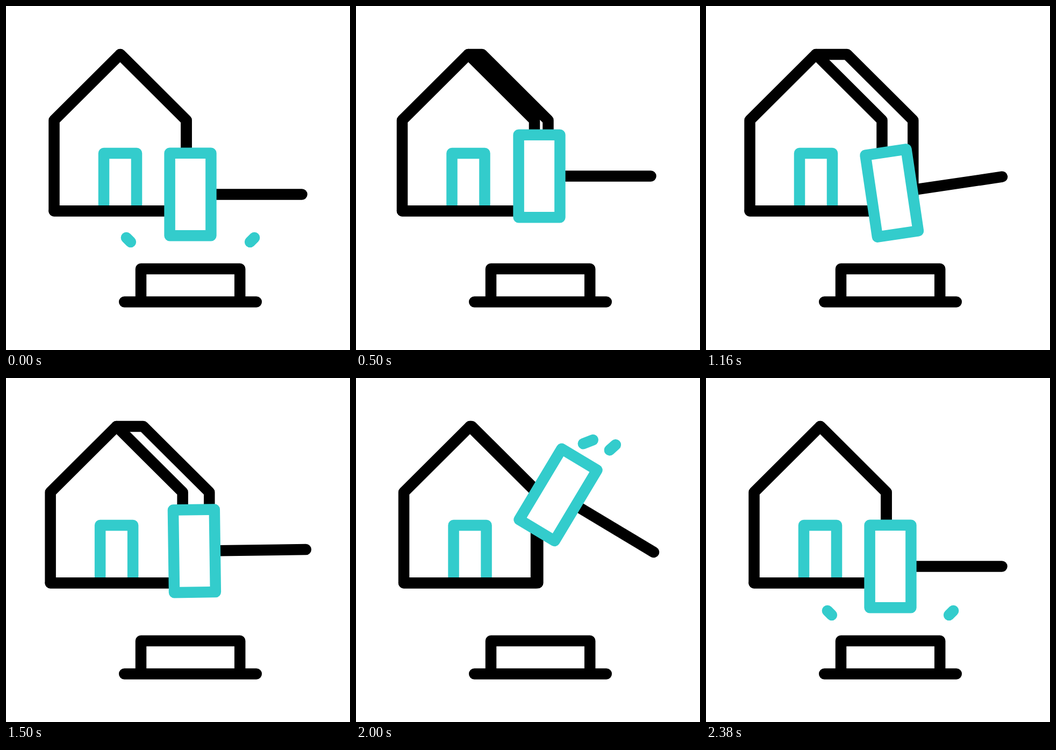
Animation, 640 px wide and 640 px high, one loop 2400 ms. Source, as an HTML page:

```html
<!DOCTYPE html>
<html lang="en">
<head>
<meta charset="utf-8">
<title>House auction</title>
<style>
  html, body { margin: 0; width: 100%; height: 100%; overflow: hidden; background: #fff; }
  svg { display: block; width: 100vw; height: 100vh; }
  path { fill: none; stroke: #000; stroke-width: 20.5; stroke-linecap: round; stroke-linejoin: round; }
  .teal { stroke: #33cccc; }
  .door { stroke-linecap: butt; }
  .head { fill: #fff; }
</style>
</head>
<body>
<svg viewBox="0 0 640 640">
  <path id="door" class="teal door" d="M182 381V274H243V381"/>
  <path id="back"/>
  <path id="front" d="M89.5 381.2V212.5L212.5 90L335.5 212.5V381.2Z"/>
  <path d="M251 550.4V489H435.2V550.4M220.2 550.4H465.8"/>
  <path id="sparkL" class="teal"/>
  <path id="sparkR" class="teal"/>
  <g id="hammer">
    <path d="M-180 0H0"/>
    <path class="teal head" d="M-245.9 -76.8h76.8v153.6h-76.8Z"/>
    <path id="trailA" class="teal"/>
    <path id="trailB" class="teal"/>
  </g>
</svg>
<script>
const LOOP = 2400;
const $ = id => document.getElementById(id);
const clamp = (v, a, b) => Math.min(b, Math.max(a, v));

// Eased step from 0 to 1 between two times.
function ease(t, from, to) {
  const u = clamp((t - from) / (to - from), 0, 1);
  return u * u * (3 - 2 * u);
}

function segment(id, x1, y1, x2, y2, shown) {
  $(id).setAttribute('d', shown ? `M${x1} ${y1}L${x2} ${y2}` : '');
}

function shift(id, dx) {
  $(id).setAttribute('transform', `translate(${dx} 0)`);
}

function house(t) {
  const depth = ease(t, 114, 954) - ease(t, 1310, 2118);
  const near = -8 * depth, far = 49.8 * depth;
  shift('front', near);
  shift('door', near);
  $('back').setAttribute('d',
    `M${212.5 + near} 90H${212.5 + far}L${335.5 + far} 212.5V381.2H${89.5 + near}`);
}

// Lift, dip, swing up, strike; the pivot is the end of the handle.
function hammer(t) {
  const lift = ease(t, 60, 500);
  const angle = 1.3 * ease(t, 500, 840) - 19.3 * ease(t, 900, 1420)
    + 53 * ease(t, 1280, 1860) - 35 * ease(t, 1910, 2340);
  const x = 550.5 - 2 * lift + 11.5 * ease(t, 920, 1720) - 9.5 * ease(t, 1640, 2250);
  const y = 350.5 - 34 * lift + 2.5 * ease(t, 840, 1500) + 31.5 * ease(t, 1885, 2340);
  $('hammer').setAttribute('transform', `translate(${x} ${y}) rotate(${angle})`);
}

// Speed line behind the falling head: grows, then shrinks toward its far end.
function trail(id, x, y, dx, dy, t) {
  const a = clamp((t - 2080) / 90, 0, 1), b = clamp((t - 1920) / 80, 0, 1);
  segment(id, x + dx * a, y + dy * a, x + dx * b, y + dy * b, b > a);
}

// Mirrored sparks sliding outward around the moment of impact.
function sparks(t) {
  const s = t > LOOP / 2 ? t - LOOP : t;
  const tip = clamp(224 - s / 10, 218, 234), tail = clamp(232 - s / 10, 218, 234);
  segment('sparkL', tip, tip + 207, tail, tail + 207, tail > tip);
  segment('sparkR', 686 - tip, tip + 207, 686 - tail, tail + 207, tail > tip);
}

function draw(t) {
  house(t);
  hammer(t);
  trail('trailA', -216.3, -105.6, 11.8, -15.3, t);
  trail('trailB', -168.1, -120.6, 4.3, -14.2, t);
  sparks(t);
}

const start = performance.now();
function tick() {
  draw((performance.now() - start) % LOOP);
  requestAnimationFrame(tick);
}
tick();
</script>
</body>
</html>
```
